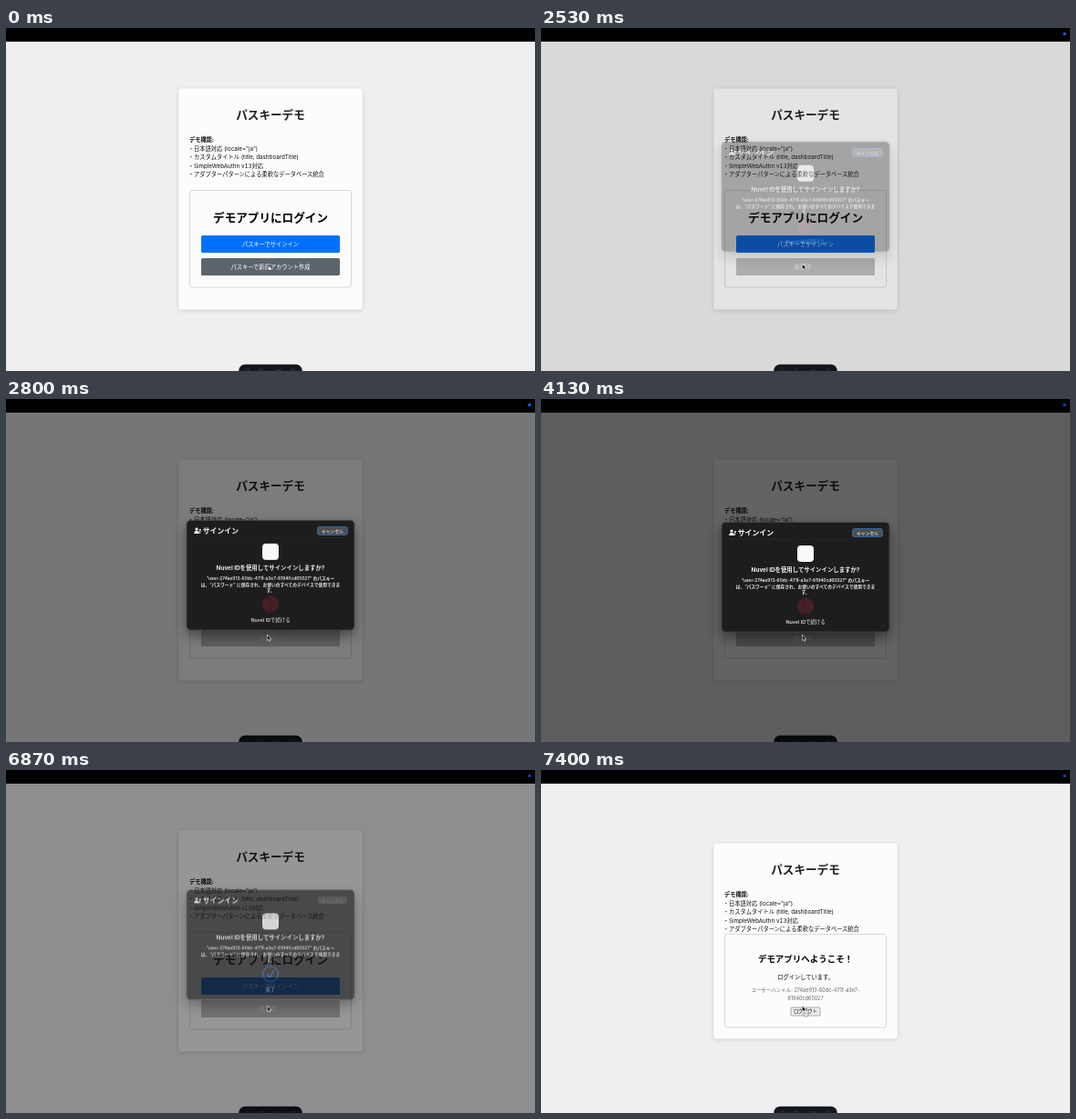
An HTML page that plays this animation: 580 by 377 pixels, repeating every 8 s.

```html
<!DOCTYPE html>
<html lang="ja">
<head>
<meta charset="utf-8">
<title>パスキーデモ</title>
<style>
html, body { margin: 0; width: 100%; height: 100%; overflow: hidden; background: #efefef; }
svg { display: block; width: 580px; height: 377px; font-family: Inter, "Noto Sans CJK JP", sans-serif; }
.mid { text-anchor: middle; }
.bold { font-weight: 700; }
.h1 { font-size: 12.6px; font-weight: 700; }
.h2 { font-size: 9.47px; font-weight: 700; }
.body { font-size: 6.25px; font-variant-numeric: tabular-nums; }
.btn { font-size: 6.25px; fill: #fff; }
.note { font-size: 5.5px; fill: #666; }
.tiny { font-size: 4.76px; font-weight: 600; }
.card { fill: #fcfcfc; filter: drop-shadow(0 1px 2px rgba(0,0,0,.14)); }
.frame { fill: #fcfcfc; stroke: #d9d9d9; stroke-width: 1; }
#panel { filter: drop-shadow(0 6px 7px rgba(0,0,0,.45)); }
</style>
</head>
<body>
<svg viewBox="0 0 580 377">
  <defs>
    <g id="intro" fill="#111">
      <text class="h1 mid" x="290" y="100.1" fill="#222">パスキーデモ</text>
      <g class="body">
        <text class="bold" x="201" y="125">デモ機能:</text>
        <text x="199.8" y="134.5">・</text><text x="206" y="134.5">日本語対応 (locale="ja")</text>
        <text x="199.8" y="144">・</text><text x="206" y="144">カスタムタイトル (title, dashboardTitle)</text>
        <text x="199.8" y="153.5">・</text><text x="206" y="153.5">SimpleWebAuthn v13対応</text>
        <text x="199.8" y="162.9">・</text><text x="206" y="162.9">アダプターパターンによる柔軟なデータベース統合</text>
      </g>
    </g>
  </defs>

  <rect width="580" height="377" fill="#efefef"/>

  <g id="login">
    <rect class="card" x="189.3" y="66.5" width="201.4" height="243" rx="3"/>
    <use href="#intro"/>
    <rect class="frame" x="201.5" y="178.5" width="177" height="106.5" rx="2.5"/>
    <text class="h1 mid" x="290" y="213.3">デモアプリにログイン</text>
    <rect x="214" y="228" width="152" height="19" rx="1.6" fill="#0071fb"/>
    <text class="btn mid" x="290" y="239.8">パスキーでサインイン</text>
    <rect id="signup" x="214" y="253" width="152" height="19" rx="1.6" fill="#5c656c"/>
    <text id="create" class="btn mid" x="290" y="264.9">パスキーで新規アカウント作成</text>
    <text id="busy" class="btn mid" x="290" y="264.9" fill-opacity=".75" opacity="0">処理中...</text>
  </g>

  <g id="home" opacity="0">
    <rect class="card" x="189.3" y="80.5" width="201.4" height="215" rx="3"/>
    <use href="#intro" y="14.4"/>
    <rect class="frame" x="201.5" y="180.5" width="177" height="102.5" rx="2.5"/>
    <text class="h2 mid" x="290" y="211">デモアプリへようこそ！</text>
    <text class="body mid" x="290" y="229.5">ログインしています。</text>
    <text class="note mid" x="290" y="244.4">ユーザーハンドル: 274ae913-60dc-471f-a3e7-</text>
    <text class="note mid" x="290" y="253">81940cd65027</text>
    <rect x="274" y="261" width="32" height="9" rx=".5" fill="#efefef" stroke="#767676" stroke-width=".6"/>
    <text class="mid" font-size="5.26" x="290" y="267.4">ログアウト</text>
  </g>

  <rect x="255.2" y="369.8" width="69.6" height="16" rx="7" fill="#14181d"/>
  <g fill="none" stroke="#394049" stroke-width=".8">
    <circle cx="265" cy="377" r="2.2"/><circle cx="280" cy="377" r="2.2"/>
    <path d="M295 376h7"/><circle cx="315" cy="377" r="2.2"/>
  </g>

  <rect id="dim" width="580" height="377" opacity="0"/>
  <rect width="580" height="15"/>
  <circle id="dot" cx="574" cy="6.4" r="1.7" fill="#1560f5" opacity="0"/>

  <g id="dialog" opacity="0">
    <g id="panel"><rect x="198" y="135.5" width="184" height="120.5" rx="4.5" fill="#1d1d1d" stroke="#4c4c4c" stroke-width=".7"/></g>
    <path d="M206 154.5h168" stroke="#fff" stroke-opacity=".06" stroke-width=".6"/>
    <g fill="#fff">
      <circle cx="209" cy="145" r="1.6"/>
      <path d="M206.2 150q0-2.9 2.9-2.9t2.8 2.9z"/>
      <circle cx="212.8" cy="146" r="1"/><path d="M212.4 146.5h.8v3.2l-.4.5-.4-.5z"/>
      <text class="bold" font-size="7.9" x="215.7" y="149.7">サインイン</text>
    </g>
    <g id="cancel" class="mid">
      <rect x="341.5" y="142.5" width="33" height="9" rx="2.5" fill="#4d4f52" stroke="#2a6aa3" stroke-width="1"/>
      <text font-size="4.8" x="358" y="148.7" fill="#fff">キャンセル</text>
    </g>
    <g id="cancelOff" class="mid" opacity="0">
      <rect x="342" y="142.5" width="32" height="8.5" rx="2" fill="#393939"/>
      <text font-size="4.8" x="358" y="148.7" fill="#777">キャンセル</text>
    </g>
    <rect x="281" y="161" width="18" height="18" rx="4" fill="#f7f9fa"/>
    <g class="mid" fill="#f2f2f2">
      <text class="bold" font-size="6.4" x="290" y="189.6">Nuvel IDを使用してサインインしますか?</text>
      <g class="tiny">
        <text x="290" y="201.4">“user-274ae913-60dc-471f-a3e7-81940cd65027” のパスキー</text>
        <text x="290" y="207.5">は、“パスワード” に保存され、お使いのすべてのデバイスで使用できま</text>
        <text x="290" y="213.7">す。</text>
      </g>
      <g font-size="5.4" font-weight="500">
        <text id="prompt" x="290" y="246.9">Nuvel IDで続ける</text>
        <text id="done" x="290" y="246.9" opacity="0">完了</text>
      </g>
    </g>
    <g id="print" fill="none" stroke="#56262d" stroke-width=".8">
      <circle cx="290" cy="227.7" r="9.3" fill="#3b1c20" stroke="none"/>
    </g>
    <g fill="none" stroke="#2f6fd6" stroke-linecap="round">
      <circle id="ring" cx="290" cy="227.8" r="8.5" stroke-width="1" pathLength="100" stroke-dasharray="100 100"
        stroke-dashoffset="100" transform="rotate(-90 290 227.8)" opacity="0"/>
      <path id="check" d="M286.6 228.6l2.5 3 4.3-7" stroke-width="1.1" pathLength="100" stroke-dasharray="100 100"
        stroke-dashoffset="100" opacity="0"/>
    </g>
  </g>

  <g stroke-linejoin="round">
    <path id="hand" fill="#fff" stroke="#111" stroke-width=".6"
      d="M287.2 260q.9-.5 1.1.5v1.9l2.4.5q.9.3.7 1.3l-.5 2.1h-2.8l-1.9-2.5q.1-.8 1 0z"/>
    <path id="arrow" fill="#000" stroke="#fff" stroke-width=".6" opacity="0"
      d="M286.4 259.2v6.3l1.5-1.3 1 2.2 1-.5-1-2.1h1.9z"/>
    <g id="badge" opacity="0" fill="#e8e8e8" stroke="#8d8d8d" stroke-width=".8">
      <circle cx="290.3" cy="267.6" r="3.4"/><path d="M288 267.6h4.6"/>
    </g>
  </g>
</svg>
<script>
const LOOP = 8000;
const el = id => document.getElementById(id);

// steps: [ms, value] pairs, interpolated; the ends are held
function track(id, prop, steps) {
  const all = [[0, steps[0][1]], ...steps, [LOOP, steps.at(-1)[1]]];
  el(id).animate(all.map(([ms, v]) => ({ offset: ms / LOOP, [prop]: v })),
    { duration: LOOP, iterations: Infinity });
}
const swap = (id, ms, from, to) => track(id, 'opacity', [[ms, from], [ms, to]]);
const show = (id, ms) => swap(id, ms, 0, 1);
const hide = (id, ms) => swap(id, ms, 1, 0);
const shift = y => `translateY(${y}px)`;

// ridges of the fingerprint
for (let i = 0; i < 5; i++) {
  const c = document.createElementNS('http://www.w3.org/2000/svg', 'circle');
  const r = 1.3 + i * 1.7;
  for (const [k, v] of Object.entries({ cx: 290, cy: 227.7, r, 'stroke-dasharray': `${r * 2.3} ${r * .5}`,
    'stroke-dashoffset': i * 2.1 })) c.setAttribute(k, v);
  el('print').append(c);
}

track('dot', 'opacity', [[70, 0], [400, 1], [3330, 1], [3530, .75]]);

hide('create', 2070);
show('busy', 2070);
track('signup', 'fill', [[2070, '#5c656c'], [2330, '#bcbec0']]);
hide('hand', 2070);
show('arrow', 2070);

track('dim', 'opacity', [[2470, 0], [2670, .315], [2870, .605], [6730, .605], [6870, .41], [7130, 0]]);
track('dialog', 'opacity', [[2470, 0], [2660, 1], [6730, 1], [6870, .64], [7070, 0]]);
track('dialog', 'transform', [[2470, shift(-12)], [2670, shift(-6.3)], [2870, shift(0)],
  [6730, shift(0)], [6870, shift(-3.6)], [7130, shift(-12)]]);

hide('cancel', 4270);
show('cancelOff', 4270);
hide('prompt', 4400);
show('done', 4400);
track('print', 'opacity', [[4200, 1], [4500, 0]]);
show('ring', 4330);
track('ring', 'strokeDashoffset', [[4330, 100], [4800, 0]]);
show('check', 4700);
track('check', 'strokeDashoffset', [[4700, 100], [5000, 0]]);

hide('login', 7400);
show('home', 7400);
show('badge', 7400);
</script>
</body>
</html>
```
